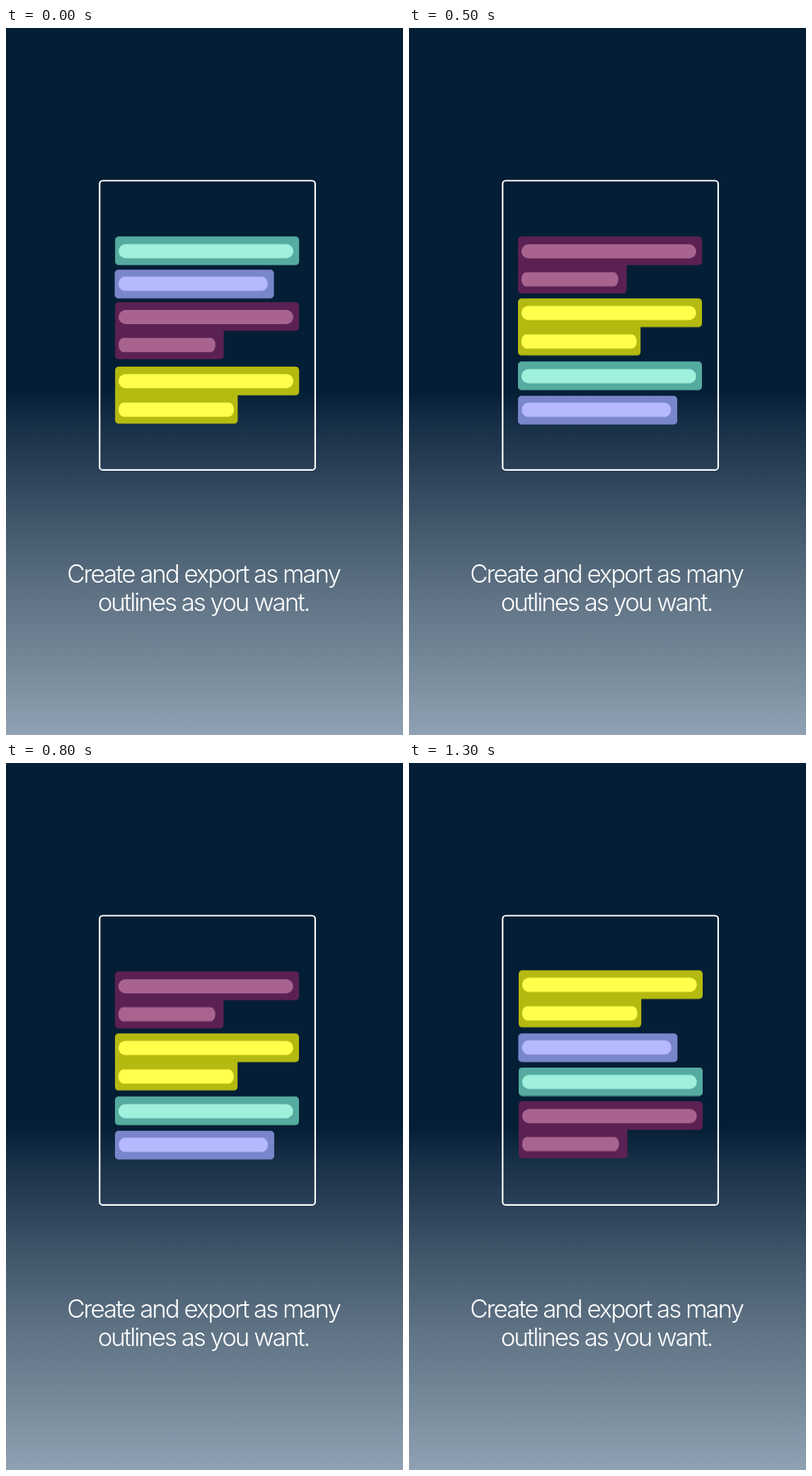
An HTML page that plays this animation: 561x998 px, repeating every 1500 ms.

```html
<!DOCTYPE html>
<html lang="en">
<head>
<meta charset="utf-8">
<title>Outlines</title>
<style>
  html, body { margin: 0; width: 100%; height: 100%; overflow: hidden; background: #041e36; }
  svg { display: block; width: 561px; height: 998px; }
  text {
    font: 300 35px Inter, "Open Sans", sans-serif;
    font-optical-sizing: none;
    letter-spacing: -2.1px;
    text-anchor: middle;
    fill: #fff;
  }
</style>
</head>
<body>
<svg viewBox="0 0 561 998">
  <defs>
    <linearGradient id="sky" gradientUnits="userSpaceOnUse" x1="0" y1="0" x2="0" y2="998">
      <stop offset=".514" stop-color="#041e36"/>
      <stop offset=".56" stop-color="#172f46"/>
      <stop offset=".62" stop-color="#283f56"/>
      <stop offset=".7" stop-color="#42576a"/>
      <stop offset=".8" stop-color="#5e7284"/>
      <stop offset=".9" stop-color="#768999"/>
      <stop offset="1" stop-color="#8fa1b2"/>
    </linearGradient>
  </defs>
  <rect width="561" height="998" fill="url(#sky)"/>
  <rect x="132.3" y="215.5" width="304.6" height="408.4" rx="4.5" fill="none" stroke="#fff" stroke-width="2.2"/>
  <g id="blocks"></g>
  <text x="279" y="783">Create and export as many</text>
  <text x="279" y="823">outlines as you want.</text>
</svg>
<script>
  const DURATION = 1500;
  const R = 5;

  // lines: [block width, pill width, pill top, pill end radius]
  // at: [x, y] of the block in each step
  const blocks = [
    { back: '#55ab9f', front: '#9ff0dc', lines: [[260, 247, 10.8, 10]],
      at: [[154.2, 294.2], [154, 470.7], [155, 429.5]] },
    { back: '#7a86cb', front: '#b5b9fd', lines: [[225, 211, 9.8, 8.5]], inset: 5.3,
      at: [[153.6, 341.2], [154, 519.2], [154.4, 381.7]] },
    { back: '#5c2153', front: '#a8648f', lines: [[260, 247, 11, 10], [153.5, 137, 50.5, 6.5]],
      at: [[154.2, 387], [154, 294.2], [155, 477.4]] },
    { back: '#b4ba10', front: '#ffff4c', lines: [[260, 247, 10.4, 10], [173.2, 163, 50.7, 7]],
      at: [[154.2, 478], [154, 381.7], [155, 292.6]] }
  ];

  const draw = (parent, tag, attrs) => {
    const el = document.createElementNS('http://www.w3.org/2000/svg', tag);
    for (const key in attrs) el.setAttribute(key, attrs[key]);
    return parent.appendChild(el);
  };

  // One bar, or a long bar with a shorter one joined below it
  const outline = ([[w], second]) => {
    const corner = (x, y) => `a${R} ${R} 0 0 1 ${x * R} ${y * R}`;
    const top = `M${R} 0H${w - R}${corner(1, 1)}V${40.4 - R}${corner(-1, 1)}`;
    const step = second ? `H${second[0]}V${80.6 - R}${corner(-1, 1)}` : '';
    return `${top}${step}H${R}${corner(-1, -1)}V${R}${corner(1, -1)}Z`;
  };

  const root = document.getElementById('blocks');
  for (const { back, front, lines, at, inset = 4.8 } of blocks) {
    const group = draw(root, 'g', {});
    draw(group, 'path', { d: outline(lines), fill: back });
    for (const [, width, y, rx] of lines)
      draw(group, 'rect', { x: inset, y, width, height: 20, rx, ry: 10, fill: front });

    const frames = [...at, at[0]].map(([x, y], i) => ({
      transform: `translate(${x}px, ${y}px)`,
      offset: i / at.length,
      easing: 'step-end'
    }));
    group.animate(frames, { duration: DURATION, iterations: Infinity });
  }
</script>
</body>
</html>
```
